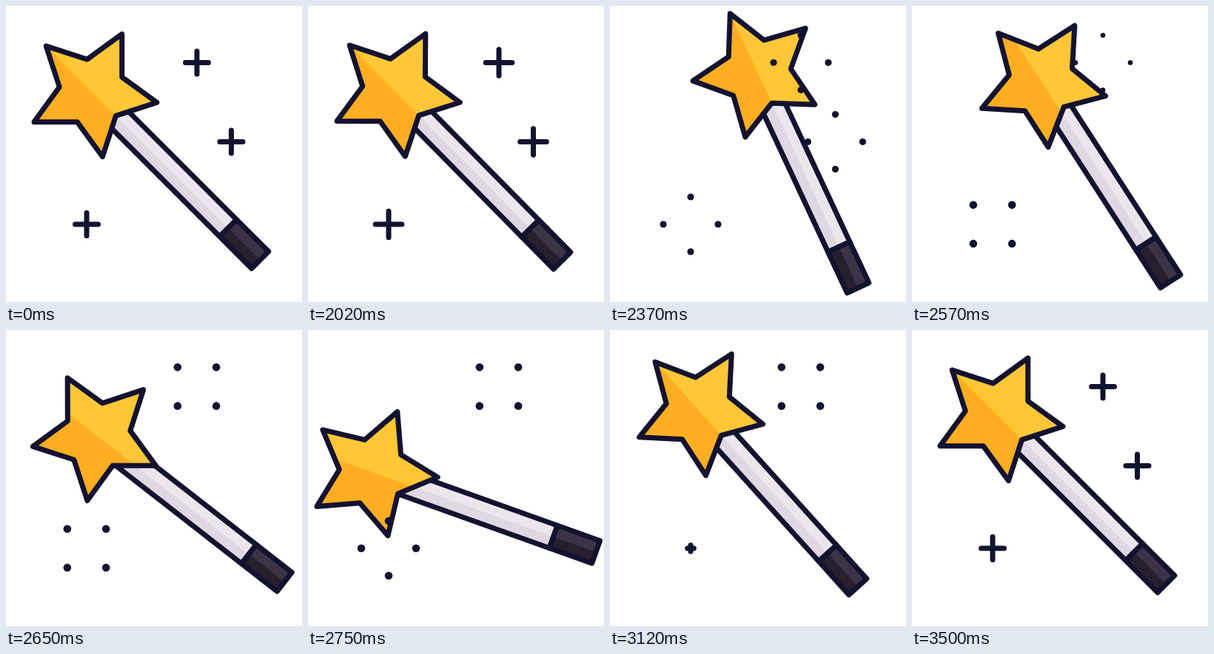
Animation of 400 by 400 pixels, one loop 3.52 s. Source, as an HTML page with a canvas:

```html
<!DOCTYPE html>
<html lang="en">
<head>
<meta charset="utf-8">
<title>Magic wand</title>
<style>
  html, body { margin: 0; width: 100%; height: 100%; overflow: hidden; background: #fff; }
  canvas { display: block; width: 400px; height: 400px; }
</style>
</head>
<body>
<canvas id="stage"></canvas>
<script>
const LOOP = 3520;
const START = 1995;
const INK = '#13122f';
const HALF = 16.2;
const QUARTER = Math.PI / 2;

const canvas = document.getElementById('stage');
const ctx = canvas.getContext('2d');
const dpr = window.devicePixelRatio || 1;
canvas.width = canvas.height = 400 * dpr;

const ramp = (t, from, length) => Math.min(1, Math.max(0, (t - from) / length));
const ease = (t, from, length) => {
  const u = ramp(t, from, length);
  return u * u * (3 - 2 * u);
};

function starPath(turn) {
  const path = new Path2D();
  for (let i = 0; i < 10; i++) {
    const r = i % 2 ? 88.3 : 45;
    const a = i * Math.PI / 5 + turn;
    path.lineTo(r * Math.cos(a), r * Math.sin(a));
  }
  path.closePath();
  return path;
}

// A bar along the wand, its lower half in the darker tone
function bar(x, w, light, dark) {
  ctx.fillStyle = light;
  ctx.fillRect(x, -HALF, w, 2 * HALF);
  ctx.fillStyle = dark;
  ctx.fillRect(x, 0, w, HALF);
  ctx.strokeRect(x, -HALF, w, 2 * HALF);
}

function drawWand(t) {
  // Wind up, strike, swing back past rest, settle
  const lift = ease(t, START, 310);
  const strike = ease(t, 2500, 270);
  const back = ease(t, 2800, 300);
  const settle = ease(t, 3100, 340);
  const degrees = 20 * lift - 46 * strike + 29 * back - 3 * settle;

  ctx.save();
  ctx.translate(
    230.2 + 37.3 * lift - 29.5 * strike - 10.3 * back + 2.5 * settle,
    230.1 + 5.8 * lift + 10.4 * strike - 18.2 * back + 2 * settle
  );
  ctx.rotate((45 + degrees) * Math.PI / 180);
  bar(-140, 239, '#ebe6ee', '#dfd7e2');
  bar(99, 61, '#3b3447', '#26202d');

  ctx.translate(-160.6, 0);
  const star = starPath(-4 * QUARTER * ease(t, 2515, 600));
  ctx.fillStyle = '#ffc738';
  ctx.fill(star);
  ctx.save();
  ctx.beginPath();
  ctx.rect(-100, 0, 200, 100);
  ctx.clip();
  ctx.fillStyle = '#ffae22';
  ctx.fill(star);
  ctx.restore();
  ctx.stroke(star);
  ctx.restore();
}

function arms(from, to) {
  ctx.beginPath();
  for (let i = 0; i < 4; i++) {
    const c = Math.cos(i * QUARTER), s = Math.sin(i * QUARTER);
    ctx.moveTo(c * from, s * from);
    ctx.lineTo(c * to, s * to);
  }
  ctx.stroke();
}

function ring(r, turn) {
  ctx.fillStyle = INK;
  for (let i = 0; i < 4; i++) {
    const a = i * QUARTER + turn;
    ctx.beginPath();
    ctx.arc(37 * Math.cos(a), 37 * Math.sin(a), r, 0, 4 * QUARTER);
    ctx.fill();
  }
}

// A plus bursts into four dots, which blink straight and diagonal by turns
// for four beats; then the plus grows back
function drawSpark(x, y, beat, regrow, t) {
  const burst = START + 350;
  const age = t - burst;
  ctx.save();
  ctx.translate(x, y);
  if (age < 0) {
    arms(37 * ramp(t, burst - 300, 300), 15.5 + 21.5 * ramp(t, START, 240));
  } else if (age < 4 * beat) {
    const into = age % beat;
    ring(5.3 * Math.min(1, into / 30, (beat - into) / 30),
         Math.floor(age / beat) % 2 * QUARTER / 2);
  } else if (t > regrow) {
    arms(0, 15.5 * ease(t, regrow, 160));
  }
  ctx.restore();
}

function draw(t) {
  ctx.setTransform(dpr, 0, 0, dpr, 0, 0);
  ctx.fillStyle = '#fff';
  ctx.fillRect(0, 0, 400, 400);
  ctx.strokeStyle = INK;
  ctx.lineWidth = 7;
  ctx.lineCap = ctx.lineJoin = 'round';
  drawWand(t);
  drawSpark(258, 76.5, 245, 3325, t);
  drawSpark(304.5, 183.5, 55, 3150, t);
  drawSpark(109, 295, 180, 3065, t);
}

const begin = performance.now();
function tick(now) {
  draw(Math.max(0, now - begin) % LOOP);
  requestAnimationFrame(tick);
}
draw(0);
requestAnimationFrame(tick);
</script>
</body>
</html>
```
